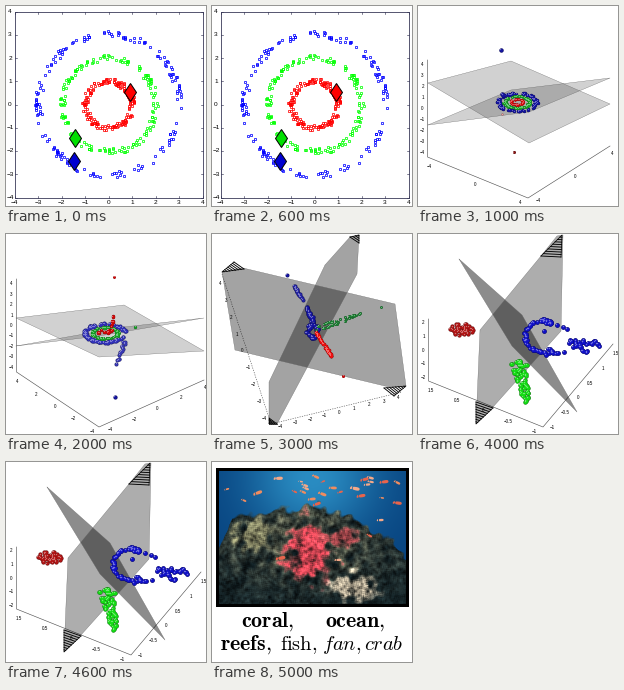
Write a matplotlib script that moves like this. It is 200 px wide and 200 px high and loops after 6000 ms.

```python
import numpy as np
import matplotlib.pyplot as plt
from matplotlib.animation import FuncAnimation
from matplotlib.colors import to_rgb
from matplotlib.patches import Polygon, Rectangle

PT = 0.72  # points per pixel at 100 dpi
plt.rcParams["mathtext.fontset"] = "cm"

fig = plt.figure(figsize=(2, 2), dpi=100, facecolor="white")
ax = fig.add_axes([0, 0, 1, 1])

RED, GREEN, BLUE = "#d80808", "#18a828", "#1414a0"


def line(points, color="black", width=0.6, **kw):
    x, y = zip(*points)
    ax.plot(x, y, color=color, lw=width * PT, **kw)


def label(x, y, value, size=4.5):
    ax.text(x, y, str(value).replace("-", "\u2212"), fontsize=size * PT,
            ha="center", va="center", family="Liberation Sans")


def shape(points, color, alpha=1.0, z=2):
    ax.add_patch(Polygon(points, fc=color, ec="none", alpha=alpha, zorder=z))


def plane(points, alpha):
    shape(points, "black", alpha)
    line(points + points[:1], "#606060", 0.3, zorder=3)


def box(corners, values, offsets=((-5, 0), (-3, 7), (6, 5)), style="-"):
    """Axis lines through the corners, each with its own row of labels."""
    line(corners, "#505050", 0.6, ls=style)
    for a, b, (dx, dy), row in zip(corners, corners[1:], offsets, values):
        for t, value in zip(np.linspace(0.05, 0.95, len(row)), row):
            label(a[0] + t * (b[0] - a[0]) + dx,
                  a[1] + t * (b[1] - a[1]) + dy, value)


def hatch(tip, a, b, n=8):
    """Dense black strokes filling a corner of a plane."""
    tip, a, b = map(np.array, (tip, a, b))
    for t in np.linspace(0.1, 1, n):
        line([tip + t * (a - tip), tip + t * (b - tip)], width=0.9, zorder=4)
    line([a, tip, b], width=0.7, zorder=4)


def balls(points, color, r=2.0):
    """Small shaded spheres: dark rim, body and highlight."""
    p = np.atleast_2d(points)
    rgb = np.array(to_rgb(color))
    for k, tone, shift in ((1, rgb * 0.6, 0), (0.75, rgb, 0),
                           (0.3, rgb * 0.6 + 0.4, 0.3)):
        ax.scatter(*(p - shift * r).T, s=(2 * k * r * PT) ** 2,
                   color=[tone], linewidths=0, zorder=5)


def along(a, b, n, spread, rng):
    """Random points scattered about a straight stroke."""
    t = rng.uniform(0, 1, (n, 1))
    return np.array(a) * (1 - t) + np.array(b) * t + rng.normal(0, spread, (n, 2))


def ring(cx, cy, rx, ry, n, noise, rng, start=0.0, stop=2.0):
    """Random points near an elliptic arc, angles in units of pi."""
    a = np.pi * rng.uniform(start, stop, n)
    k = 1 + rng.uniform(-noise, noise, n)
    return np.c_[cx + rx * k * np.cos(a), cy + ry * k * np.sin(a)]


def circles():
    rng = np.random.default_rng(4)
    step, cx, cy = 23.5, 102.5, 98.5
    x0, x1, y0, y1 = 8.5, 196.5, 5.5, 191.5
    ax.add_patch(Rectangle((x0, y0), x1 - x0, y1 - y0, fill=False,
                           ec="#303050", lw=0.8 * PT))
    for k in range(-4, 5):
        x, y = cx + step * k, cy - 23.25 * k
        label(x, 196.5, k, 6.5)
        label(4, y, k, 6.5)
        for end, d in ((y1, -2), (y0, 2)):
            line([(x, end), (x, end + d)], "#303050")
        for end, d in ((x0, 2), (x1, -2)):
            line([(end, y), (end + d, y)], "#303050")
    for r, color in ((3, "blue"), (2, "lime"), (1, "red")):
        p = ring(cx, cy, step * r, step * r, 170, 0.13 / r, rng)
        ax.plot(*p.T, "s", ms=2.6 * PT, mfc="none", mec=color, mew=0.75 * PT)
    for x, y, color in ((124, 86, "red"), (69, 132, "#00e000"),
                        (68, 155, "#0000d0")):
        ax.plot(x, y, "d", ms=13 * PT, mfc=color, mec="black", mew=PT, zorder=6)


def tilted_rings():
    rng = np.random.default_rng(5)
    box([(9.5, 54), (9.5, 151), (110, 192), (192, 140)],
        [range(4, -5, -1), (-4, 0, 4), (-4, 0, 4)])
    plane([(10, 77), (93, 55), (192, 98), (111, 137)], 0.18)
    plane([(10, 119), (93, 84), (192, 72), (111, 106)], 0.18)
    for size, color, n in ((19, BLUE, 95), (12.5, GREEN, 75), (6, RED, 45)):
        balls(ring(99, 96, size, size * 0.46, n, 0.1, rng), color,
              1 + size / 27)
    balls([(82.5, 44), (84, 88), (85, 89)], BLUE, 2.2)
    balls([(95.5, 146)], "#901818", 1.5)
    balls([(84, 108)], "#e08c8c", 1.1)


def pulled_rings():
    rng = np.random.default_rng(8)
    box([(10.5, 45), (10.5, 138), (93, 193), (198, 146)],
        [range(4, -5, -1), range(4, -5, -2), range(-4, 5, 2)])
    plane([(10, 84), (118, 71), (198, 117), (93, 123)], 0.18)
    plane([(10, 112), (118, 93), (198, 84), (93, 102)], 0.18)
    balls(ring(99, 99, 20, 9, 105, 0.08, rng, 0.12, 1.96), "#3030b8")
    balls(ring(99, 99, 13, 5.5, 70, 0.12, rng), GREEN, 1.5)
    balls(along((118, 106), (110, 132), 15, 0.7, rng), "#3838b4")
    balls(along((92, 98), (105, 97), 12, 0.7, rng), RED, 1.7)
    balls(along((105, 97), (107, 80), 9, 0.6, rng), RED, 1.7)
    balls([(108, 42.5)], RED, 1.4)
    balls([(129, 92.5)], GREEN, 1.6)
    balls([(109, 162.5)], BLUE, 2.1)


def stretched_arms():
    rng = np.random.default_rng(2)
    box([(10, 40), (59, 190), (190, 158)],
        [range(4, -5, -1), range(-4, 5)], ((-4, 2), (3, 4)), (0, (2, 2)))
    plane([(10, 38), (31, 34), (183, 70), (194, 152), (177, 153), (23, 116)],
          0.36)
    plane([(113, 31), (138, 3), (147, 1), (145, 40), (65, 190), (57, 190),
           (57, 148)], 0.36)
    hatch((10, 38), (22, 28), (32, 35))
    hatch((194, 152), (172, 154), (182, 162))
    hatch((57, 190), (57, 184), (65, 190), 5)
    hatch((147, 1), (138, 3), (147, 9), 4)
    balls(along((82, 51), (90, 66), 24, 0.5, rng), "#2424a4")
    balls(along((95, 74), (102, 90), 22, 0.8, rng), BLUE, 2.2)
    balls(ring(100, 97, 5, 6, 30, 0.3, rng), BLUE, 2.2)
    for lift in (0, 5):
        balls(along((104, 97 - lift), (149, 79.5), 20, 0.4, rng),
              "#208838", 1.5)
    balls(along((103, 97), (121, 125), 45, 0.4, rng), "#f01010", 1.8)
    balls([(75, 40.5)], BLUE)
    balls([(169, 73)], "#208838", 1.4)
    balls([(131, 141.5)], RED, 1.5)


def clusters():
    rng = np.random.default_rng(11)
    box([(10.5, 85), (10.5, 147), (125, 193), (195, 110)],
        [range(2, -3, -1), (1.5, 0.5, 0, -0.5, -1),
         (-1, -0.5, 0, 0.5, 1, 1.5)])
    plane([(123, 22), (139, 2), (145, 1), (143, 97), (75, 173), (58, 190),
           (62, 96)], 0.32)
    plane([(41, 25), (104, 81), (159, 178), (94, 112)], 0.45)
    hatch((144, 1), (123, 22), (143, 23), 9)
    hatch((58, 190), (58, 168), (75, 174), 9)
    balls(ring(43, 95, 8, 4, 50, 0.6, rng), "#b01414", 2.1)
    t = rng.uniform(0, 1, 70)
    side = rng.uniform(-9, 9, 70) * (1 - 0.7 * t)
    balls(np.c_[99.5 + 9 * t + side, 125 + 43 * t], "#14dc14", 2.2)
    blue = [ring(125, 102, 18, 16, 40, 0.08, rng, 0.5, 1.6),
            along((126, 118), (147, 118), 14, 1, rng),
            along((125, 87), (150, 93), 14, 1, rng),
            along((146, 107), (181, 110), 22, 1.5, rng),
            along((154, 111), (172, 119), 9, 1, rng), [(126, 97)]]
    balls(np.vstack(blue), "#1010c8", 2.4)


def grain(rng, size, passes):
    """Smoothed random field scaled to unit deviation."""
    n = rng.normal(size=size)
    for _ in range(passes):
        for axis in (0, 1):
            n = (np.roll(n, 1, axis) + n + np.roll(n, -1, axis)) / 3
    return n / n.std()


def seascape(rng):
    """Blue water over a mottled reef, as an RGB array."""
    x, y = np.meshgrid(np.arange(7, 194), np.arange(9, 142))
    rough, fine = grain(rng, x.shape, 9), grain(rng, x.shape, 1)

    def blend(base, color, mask):
        mask = np.clip(mask, 0, 1)[..., None]
        return base * (1 - mask) + np.array(color) * mask

    def patch(cx, cy, rx, ry):
        return 2.5 * (1 - np.hypot((x - cx) / rx, (y - cy) / ry) + 0.22 * rough)

    glow = np.exp(-((x - 100) / 65) ** 2 - ((y - 15) / 60) ** 2)
    image = blend(np.full(x.shape + (3,), (8, 68, 128.0)), (42, 140, 194), glow)
    top = (44 + 0.12 * np.maximum(95 - x, 0) + 2 * np.maximum(20 - x, 0)
           + 0.005 * np.maximum(x - 95, 0) ** 2 + 3 * np.sin(x / 6))
    light = np.exp(-((x - 95) / 80) ** 2 - ((y - 78) / 42) ** 2)
    stone = blend(np.full(image.shape, (18, 32, 36.0)), (122, 120, 94),
                  light * (0.55 + 0.25 * rough))
    for color, spot in (((112, 112, 84), (40, 74, 22, 16)),
                        ((186, 62, 74), (96, 90, 25, 31)),
                        ((150, 66, 70), (130, 74, 19, 11)),
                        ((164, 154, 134), (143, 125, 23, 15))):
        stone = blend(stone, color, patch(*spot) * (0.8 + 0.12 * fine))
    stone = stone * (1 + 0.18 * fine + 0.12 * rough)[..., None]
    edge = np.clip((y - top + 2 * rough) / 3, 0, 1)[..., None]
    return np.clip(image * (1 - edge) + stone * edge, 0, 255) / 255


def fish(x, y, size, tilt, color):
    a = np.linspace(0, 2 * np.pi, 24)
    # an oval body that crosses over itself into a tail
    u, v = np.cos(a) + 0.35 * np.sin(a) ** 2, 0.4 * np.sin(2 * a + 0.6) - 0.1
    body = np.c_[u, np.where(u > -0.4, 0.35 * np.sin(a), v)] * size / 2
    c, s = np.cos(tilt), np.sin(tilt)
    shape(body @ np.array([[c, s], [-s, c]]) + (x, y), color, z=4)


def reef():
    rng = np.random.default_rng(3)
    ax.add_patch(Rectangle((4, 6), 193, 139, fc="black", ec="none"))
    ax.imshow(seascape(rng), extent=(7, 194, 142, 9), aspect="auto",
              interpolation="bilinear", zorder=1)
    for k in range(30):
        depth = rng.uniform()
        fish(rng.uniform(13, 188), 14 + 36 * depth + 65 * depth ** 8,
             rng.uniform(4.5, 10), rng.uniform(-0.4, 0.5),
             ("#f08c60", "#e8644c", "#f4a888")[k % 3])

    for x, y, face, word in ((29, 165, "bf", "coral,"),
                             (113, 165, "bf", "ocean,"),
                             (8, 188, "bf", "reefs,"),
                             (67.5, 188, "rm", "fish,"),
                             (110.5, 188, "it", "fan,"),
                             (152, 188, "it", "crab")):
        size = 22 if face == "bf" else 20.5
        text = word.replace(",", r"}\mathrm{,")
        ax.text(x, y, rf"$\math{face}{{{text}}}$", fontsize=size * PT,
                va="baseline")


scenes = [circles, tilted_rings, pulled_rings, stretched_arms, clusters, reef]


def draw(i):
    ax.clear()
    ax.set_axis_off()
    scenes[i]()
    ax.set_xlim(0, 200)
    ax.set_ylim(200, 0)
    return []


anim = FuncAnimation(fig, draw, frames=len(scenes), init_func=lambda: draw(0),
                     interval=1000, repeat=True, blit=False)
plt.show()
```
